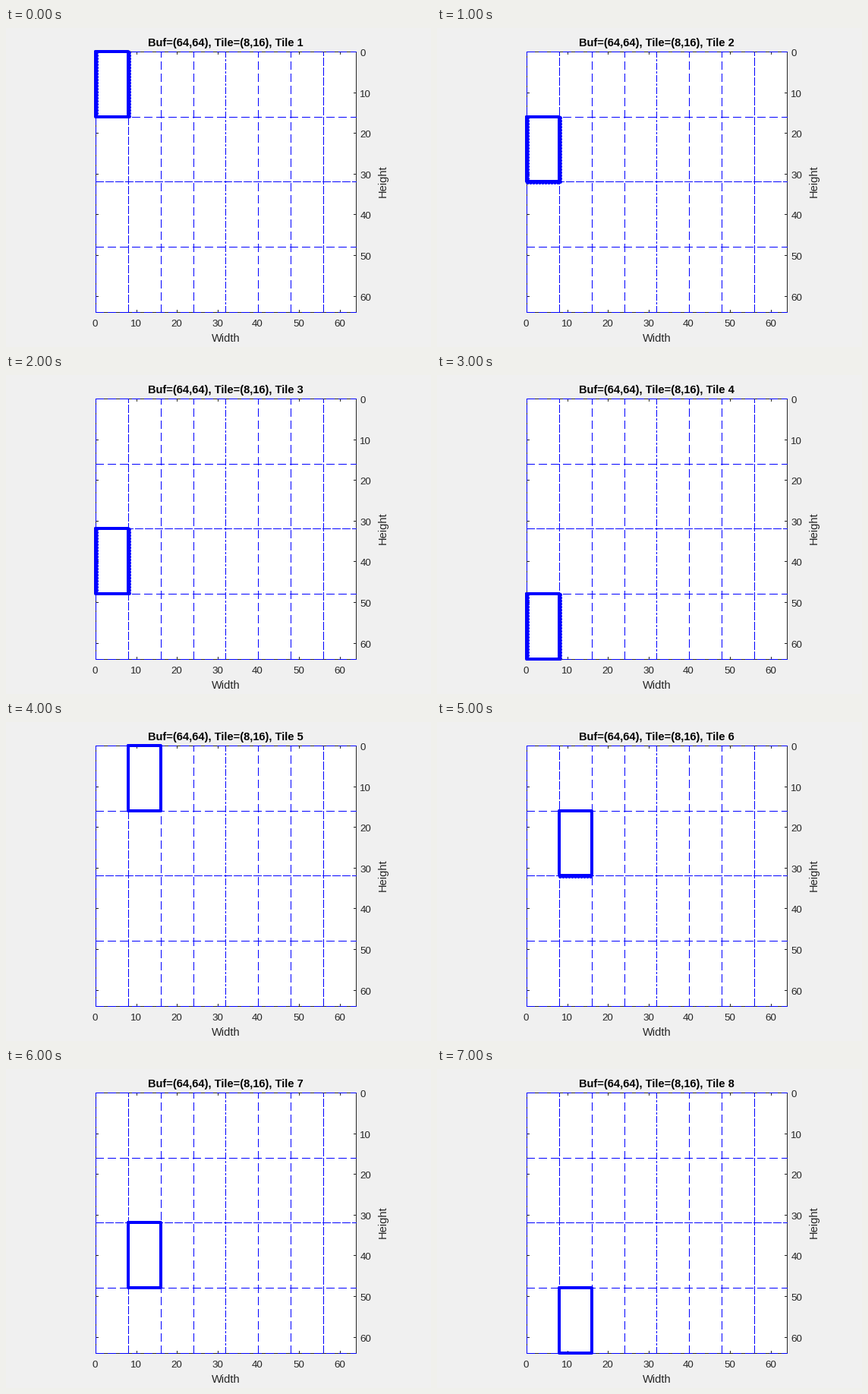
Animation, 560 px wide and 420 px high, one loop 8 s. Source, as a matplotlib script:

```python
import math

import matplotlib.pyplot as plt
import numpy as np
from matplotlib.animation import FuncAnimation

W, H, DPI = 560, 420, 80
PX = 72 / DPI                       # points per pixel
LEFT, TOP, SIDE, BUF = 118, 31, 343, 64
RIGHT, BOTTOM = LEFT + SIDE, TOP + SIDE
TILE_W, TILE_H = 8, 16
ROWS = BUF // TILE_H
BLUE, INK = "#0000ff", "#262626"
DASH, TIGHT, DASHDOT = (10, 5), (10, 2), (8, 2, 2, 2)

plt.rcParams["font.family"] = "Liberation Sans"
fig = plt.figure(figsize=(W / DPI, H / DPI), dpi=DPI, facecolor="#f0f0f0")
ax = fig.add_axes([0, 0, 1, 1])
ax.set_xlim(0, W)
ax.set_ylim(H, 0)
ax.axis("off")


def px(v, origin):
    """Pixel row or column of a buffer coordinate."""
    return origin + math.floor(v * SIDE / BUF + 0.49)


def line(x0, y0, x1, y1, color, dash=None):
    # Whole coordinates snap to the pixel that starts there.
    ax.plot([x0, x1], [y0, y1], color=color, lw=PX,
            ls=(0, dash) if dash else "-", antialiased=False,
            solid_capstyle="projecting", dash_capstyle="butt")


def label(x, y, text, size, **kw):
    kw = {"color": INK, "ha": "center", "va": "baseline", **kw}
    return ax.text(x, y, text, fontsize=size * PX, **kw)


ax.add_patch(plt.Rectangle((LEFT, TOP), SIDE, SIDE, color="white", lw=0))

# Box and ticks
for x in (LEFT, RIGHT):
    line(x, TOP, x, BOTTOM, INK)
for y in (TOP, BOTTOM):
    line(LEFT, y, RIGHT, y, INK)
for v in range(0, BUF, 10):
    x, y = px(v, LEFT), px(v, TOP)
    line(x, BOTTOM - 3, x, BOTTOM, INK)
    line(x, TOP, x, TOP + 3, INK)
    line(LEFT, y, LEFT + 3, y, INK)
    line(RIGHT - 3, y, RIGHT, y, INK)
    label(x - 0.5, 393, str(v), 13.33)
    label(466.4, y + 6, str(v), 13.33, ha="left")

# Tile grid
for i in range(BUF // TILE_W):
    x = px(i * TILE_W, LEFT)
    dash = DASHDOT if i == 4 else TIGHT if i in (0, 1, 7) else DASH
    line(x, BOTTOM, x, TOP, BLUE, dash)
for j in range(ROWS + 1):
    y = px(j * TILE_H, TOP)
    line(LEFT, y, RIGHT, y, BLUE, TIGHT if j == 2 else DASH)

label(290, 413, "Width", 14.67)
label(500.5, 201.5, "Height", 14.67, rotation=90, rotation_mode="anchor")
title = label(289.7, 24, "", 14.67, color="black", weight="bold")

tile, = ax.plot([], [], color=BLUE, lw=4 * PX, solid_joinstyle="round",
                solid_capstyle="round", zorder=5)
beads, = ax.plot([], [], "o", color=BLUE, ms=5 * PX, mew=0, zorder=6)


def draw(k):
    col, row = divmod(k, ROWS)
    x0, x1 = (px(c * TILE_W, LEFT) for c in (col, col + 1))
    y0, y1 = (px(r * TILE_H, TOP) for r in (row, row + 1))
    tile.set_data([x0, x1, x1, x0, x0], [y0, y0, y1, y1, y0])

    # Beaded edges: both sides in the first column, the base in the second row
    dots = []
    if col == 0:
        dots += [(x, y) for x in (x0, x1) for y in np.arange(y0, y1 + 1, 4)]
    if row == 1:
        dots += [(x, y1) for x in np.arange(x0, x1 + 1, 4)]
    beads.set_data([x + 0.5 for x, _ in dots], [y + 0.5 for _, y in dots])
    title.set_text(f"Buf=({BUF},{BUF}), Tile=({TILE_W},{TILE_H}), Tile {k + 1}")
    return tile, beads, title


anim = FuncAnimation(fig, draw, frames=8, interval=1000, repeat=True,
                     repeat_delay=0, blit=False)
plt.show()
```
